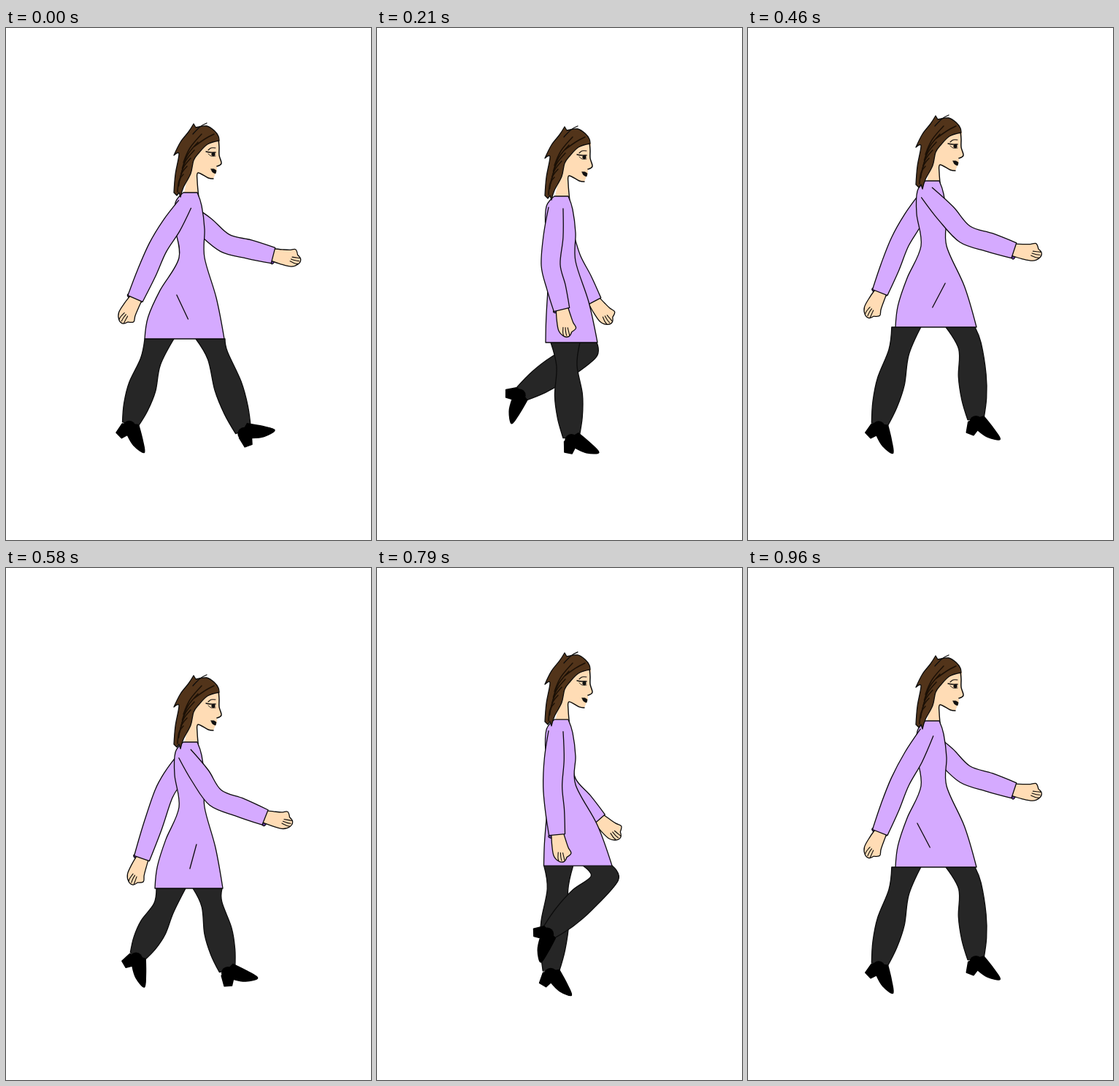
Write an HTML page with a canvas that moves like this. It is 500 by 700 pixels and loops after 1 s.

```html
<!DOCTYPE html>
<html lang="en">
<head>
<meta charset="utf-8">
<title>Walk cycle</title>
<style>
html, body { margin: 0; width: 100%; height: 100%; overflow: hidden; background: #fff; }
canvas { display: block; width: 500px; height: 700px; }
</style>
</head>
<body>
<canvas id="stage" width="500" height="700"></canvas>
<script>
const ctx = document.getElementById('stage').getContext('2d');
const LILAC = '#d5aaff', CUFF = '#5b3794', SKIN = '#ffdcb5', HAIR = '#52341a',
      CLOTH = '#262626', INK = '#0c0c0c';
const LOOP = 1000, FRAMES = 24, STEP = FRAMES / 2;

// Key poses; the first value of each row is its place in the cycle.
// One step: head drop, neck height, hem left, hem right.
const BODY = [
  [0, -4, 225, 190, 299],
  [2, 12, 238, 204, 297],
  [5, 0, 230, 231, 302],
  [9, -34, 188, 219, 338],
  [11, -15, 209, 202, 313]
];
// Two steps, shared by both legs: hip x, knee, ankle, foot angle.
const LEG = [
  [0, 280, 290, 448, 325, 551, -3],
  [2, 276, 282, 460, 303, 550, 13],
  [5, 258, 260, 462, 266, 560, 27],
  [9, 238, 233, 422, 210, 542, 66],
  [12, 210, 198, 456, 170, 542, 62],
  [14, 226, 216, 465, 180, 531, 76],
  [17, 281, 283, 443, 198, 500, 107],
  [21, 313, 328, 412, 279, 505, 89],
  [23, 291, 304, 435, 312, 535, 38]
];
// Two steps, shared by both arms: elbow, wrist, hand angle.
const ARM = [
  [0, 208, 300, 177, 370, 118],
  [2, 216, 309, 186, 397, 110],
  [5, 238, 324, 253, 385, 76],
  [9, 283, 267, 348, 306, 8],
  [12, 300, 294, 366, 311, 9],
  [14, 287, 314, 355, 341, 10],
  [17, 267, 317, 297, 374, 50],
  [21, 216, 282, 201, 353, 100]
];

// Cyclic cubic through the keys.
function sample(keys, period, frame) {
  const n = keys.length;
  frame %= period;
  let i = n - 1;
  while (keys[i][0] > frame) i--;
  const [a, b, c, d] = [-1, 0, 1, 2].map(o => {
    const turn = Math.floor((i + o) / n), row = keys[i + o - turn * n];
    return [row[0] + turn * period, ...row.slice(1)];
  });
  const span = c[0] - b[0], t = (frame - b[0]) / span, u = 1 - t;
  return b.map((p, k) => {
    const m = (c[k] - a[k]) / (c[0] - a[0]) * span;
    const e = (d[k] - p) / (d[0] - b[0]) * span;
    return u * u * (1 + 2 * t) * p + t * t * (3 - 2 * t) * c[k] + t * u * u * m - t * t * u * e;
  }).slice(1);
}

const mix = (p, q, t) => [p[0] + (q[0] - p[0]) * t, p[1] + (q[1] - p[1]) * t];
const unit = (p, q) => {
  const x = q[0] - p[0], y = q[1] - p[1], l = Math.hypot(x, y) || 1;
  return [x / l, y / l];
};

// Front and back edges of a limb around its centre line.
function edges(mid, widths) {
  const front = [], back = [];
  mid.forEach((p, i) => {
    const a = unit(mid[i - 1] || p, p), b = unit(p, mid[i + 1] || p);
    const [x, y] = unit([0, 0], [a[0] + b[0], a[1] + b[1]]), w = widths[i];
    front.push([p[0] + y * w, p[1] - x * w]);
    back.push([p[0] - y * w, p[1] + x * w]);
  });
  return { front, back };
}

// Smooth curve through the points, sharp at the listed corners.
function curve(pts, corners = [], closed = false) {
  const n = pts.length, at = i => pts[(i + n) % n];
  const slope = i => {
    i %= n;
    if (corners.includes(i) || (!closed && (i === 0 || i === n - 1))) return [0, 0];
    const p = at(i - 1), q = at(i + 1);
    return [(q[0] - p[0]) / 6, (q[1] - p[1]) / 6];
  };
  ctx.beginPath();
  ctx.moveTo(...pts[0]);
  for (let i = 0; i < (closed ? n : n - 1); i++) {
    const p = at(i), q = at(i + 1), s = slope(i), e = slope(i + 1);
    ctx.bezierCurveTo(p[0] + s[0], p[1] + s[1], q[0] - e[0], q[1] - e[1], ...q);
  }
  if (closed) ctx.closePath();
}

function paint(fill, width = 1.3, stroke = INK) {
  if (fill) { ctx.fillStyle = fill; ctx.fill(); }
  if (width) { ctx.lineWidth = width; ctx.strokeStyle = stroke; ctx.stroke(); }
}

function line(pts, width = 1.3, color = INK) {
  curve(pts);
  paint(null, width, color);
}

function placed(x, y, degrees, draw) {
  ctx.save();
  ctx.translate(x, y);
  ctx.rotate(degrees * Math.PI / 180);
  draw();
  ctx.restore();
}

function leg(frame, hem) {
  const [hipX, kx, ky, ax, ay, angle] = sample(LEG, FRAMES, frame);
  const hip = [hipX, hem], knee = [kx, ky], ankle = [ax, ay];
  const a = unit(hip, knee), b = unit(knee, ankle);
  const bulge = 5 * Math.abs(a[0] * b[1] - a[1] * b[0]);
  const { front, back } = edges(
    [hip, knee, mix(knee, ankle, .4), mix(knee, ankle, .72), ankle],
    [20, 14 + bulge, 19, 17, 11]);
  front[0] = [hipX + 20, hem];
  back[0] = [hipX - 20, hem];
  curve([...back, ...front.reverse()], [0, 4, 5, 9], true);
  paint(CLOTH);
  placed(ax, ay, angle, () => {
    curve([[-6, 9], [1, 22], [11, 19], [11, 10], [28, 9], [43, 1], [27, -5], [6, -10]], [0, 1, 2, 3, 7], true);
    paint('#000', 1.5, '#000');
  });
  // Ankle joins trouser and shoe whatever the foot angle.
  ctx.beginPath();
  ctx.arc(ax + b[0] * 4, ay + b[1] * 4, 9, 0, 7);
  paint('#000', 0);
}

function hand() {
  ctx.beginPath();
  ctx.ellipse(0, 1, 4, 11, 0, 0, 7);
  paint(CUFF, 1);
  curve([[-4, 7], [12, 10], [27, 11], [36, 6], [38, -1], [33, -6], [29, -13], [21, -11], [11, -10], [-4, -9]], [0, 5, 9], true);
  paint(SKIN);
  for (let i = 0; i < 3; i++) line([[37 - i, i * 4 - 2], [31, i * 4 - 2], [26 - i, i * 3 - 2]], 1.1);
}

function arm(frame, shoulder) {
  const [ex, ey, wx, wy, angle] = sample(ARM, FRAMES, frame);
  const elbow = [ex, ey], wrist = [wx, wy];
  placed(wx, wy, angle, hand);
  const { front, back } = edges(
    [shoulder, mix(shoulder, elbow, .5), elbow, mix(elbow, wrist, .5), wrist],
    [10, 13.5, 13, 13, 11]);
  curve([...front, ...back.reverse()], [4, 5]);
  paint(LILAC);
}

function dress(neck, left, right, frame) {
  const waist = neck + 89, hem = neck + 200, rear = 237, fore = 272;
  const flare = (from, to, out, down) => [from + (to - from) * out, waist + (hem - waist) * down];
  curve([
    [243, neck], [232, neck + 14], [231, neck + 45], [rear, waist],
    flare(rear, left, .55, .4), flare(rear, left, .9, .73), [left, hem],
    [right, hem], flare(fore, right, .6, .5), [fore, waist],
    [272, neck + 50], [268, neck + 18], [262, neck]
  ], [0, 6, 7, 12], true);
  paint(LILAC);
  // The crease sways with the stride.
  const lean = 18 * Math.cos((frame - 22) / FRAMES * 2 * Math.PI), x = 251 - lean * .6;
  line([[x - lean / 2, hem - 60], [x + lean / 2, hem - 27]]);
}

function face() {
  const profile = [[291, 156], [292, 167], [292, 178], [295, 189], [289, 193], [289, 198], [287, 203], [284, 210]];
  const jaw = [[284, 210], [277, 209], [263, 202], [262, 213], [264, 236]];
  curve([...profile, ...jaw.slice(1), [243, 236], [250, 205], [266, 165]], [4, 7, 9, 11, 12], true);
  paint(SKIN, 0);
  line(profile.slice(0, 5), 1.5);
  line(jaw, 1.4);
  line([[277, 171], [281, 168], [287, 168]], 1.1);
  line([[274, 173], [280, 174], [287, 174]], 1.4);
  ctx.beginPath();
  ctx.ellipse(284, 176.5, 2.6, 2.8, 0, 0, 7);
  paint('#111', 0);
  line([[277, 176], [281, 179], [287, 179]], .9);
  curve([[281, 197], [285, 197], [288, 199], [287, 203], [283, 201]], [0, 2, 3], true);
  paint('#111', .8);
}

function hair() {
  curve([
    [292, 158], [276, 163], [264, 175], [257, 185], [253, 203], [243, 222], [239, 235], [237, 229], [234, 233], [230, 229],
    [232, 204], [237, 176], [230, 178], [239, 160], [250, 146], [257, 135], [260, 140], [275, 138], [286, 145], [291, 152]
  ], [0, 6, 7, 8, 9, 12, 15, 16], true);
  paint(HAIR);
  line([[275, 134], [266, 139], [256, 149]]);
  line([[285, 149], [272, 156], [258, 166]], 1.5, '#1b1006');
  for (let i = 0; i < 6; i++) {
    line([[268 - 5 * i, 149 + 11 * i], [252 - 3 * i, 168 + 9 * i], [243 - 1.6 * i, 188 + 8 * i]], 1.5, '#1b1006');
  }
}

function draw(frame) {
  const [drop, neck, left, right] = sample(BODY, STEP, frame);
  const hem = neck + 200;
  ctx.fillStyle = '#fff';
  ctx.fillRect(0, 0, 500, 700);
  arm(frame + STEP, [244, neck + 22]);
  leg(frame + STEP, hem);
  leg(frame, hem);
  placed(0, drop, 0, face);
  dress(neck, left, right, frame);
  arm(frame, [245, neck + 16]);
  placed(0, drop, 0, hair);
}

ctx.lineJoin = ctx.lineCap = 'round';
const start = performance.now();
function tick(now) {
  const ms = Math.max(0, now - start) % LOOP;
  // Frames change on whole hundredths of a second.
  draw(Math.floor((Math.floor(ms / 10) * 10 + 4.9) * FRAMES / LOOP));
  requestAnimationFrame(tick);
}
tick(start);
</script>
</body>
</html>
```
